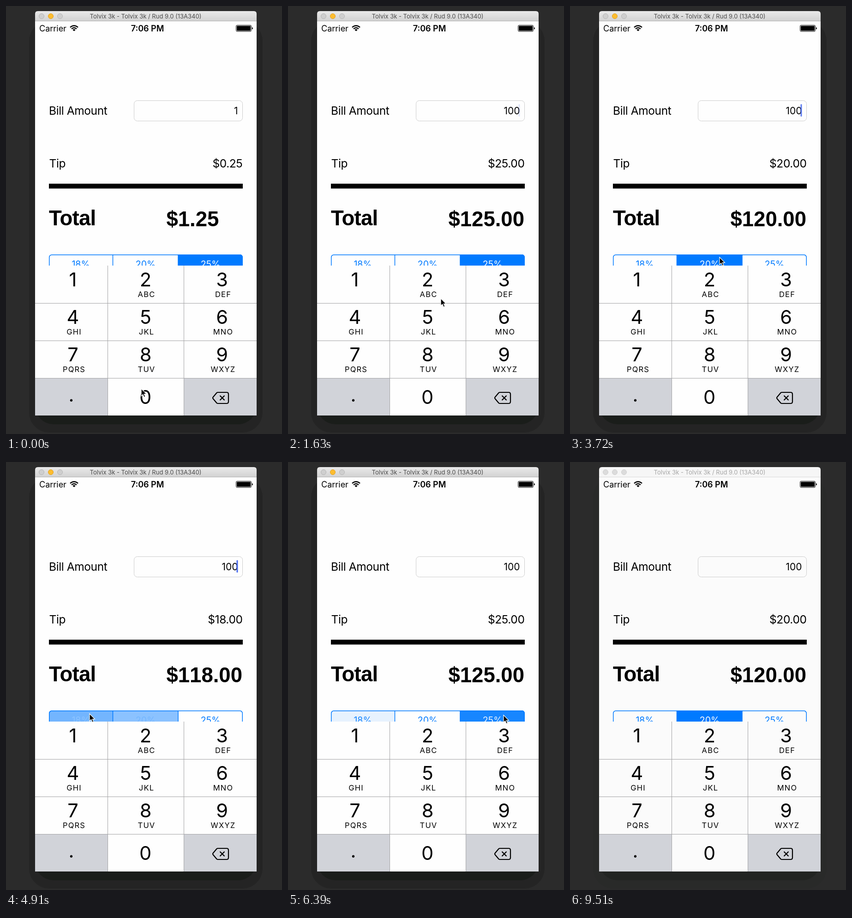
These frames come from a looping animation (598 by 925 pixels, 9610 ms). An HTML page:

```html
<!DOCTYPE html>
<html lang="en">
<head>
<meta charset="utf-8">
<title>Tip calculator</title>
<style>
  html, body { margin: 0; width: 100%; height: 100%; overflow: hidden; background: #2b2b2b; }
  svg { display: block; font-family: Inter, Roboto, sans-serif; }
  .label { font-size: 24.5px; letter-spacing: -.4px; }
  .bold { font: bold 45.5px "Liberation Sans", Arial, sans-serif; }
  #total { font-kerning: none; }
  .digit { font-size: 41.5px; text-anchor: middle; }
  .letters { font-size: 16.5px; letter-spacing: 1.2px; text-anchor: middle; }
  .percent { font-size: 19.5px; text-anchor: middle; }
  .end { text-anchor: end; }
  .mid { text-anchor: middle; }
  .line { fill: none; stroke: #000; }
  .page { fill: #fefefe; }
  #bar { fill: url(#active); }
  #barLine { fill: #b1b1b1; }
  #title { font-size: 13px; fill: #4b4b4b; }
  .light { fill: #cfcfcf; stroke: #b4b4b4; }
  .yellow { fill: #fdbd2f; stroke: #dfa023; }
  #outer { fill: #242424; }
  #inner { fill: #1a1d1a; }
  .inactive .page { fill: #fbfbfb; }
  .inactive #bar { fill: #f6f6f6; }
  .inactive #barLine { fill: #dadada; }
  .inactive #title { fill: #a6a6a6; }
  .inactive .light { fill: #dcdcdc; stroke: #cfcfcf; }
  .inactive #outer { fill: #292a29; }
  .inactive #inner { fill: #222422; }
</style>
</head>
<body>
<svg id="stage" width="598" height="925" viewBox="0 0 598 925">
  <defs>
    <linearGradient id="active" x2="0" y2="1">
      <stop stop-color="#e9e9e9"/><stop offset="1" stop-color="#d1d1d1"/>
    </linearGradient>
    <clipPath id="segClip"><rect x="93" y="537" width="420" height="44" rx="6"/></clipPath>
  </defs>

  <rect id="outer" x="50" y="32" width="506" height="890" rx="44"/>
  <rect id="inner" x="63" y="800" width="480" height="104" rx="40"/>

  <path id="bar" d="M63 33V17q0-6 6-6H537q6 0 6 6V33z"/>
  <circle class="light" cx="77" cy="22" r="5.5"/>
  <circle class="light yellow" cx="97" cy="22" r="5.5"/>
  <circle class="light" cx="117" cy="22" r="5.5"/>
  <text id="title" class="mid" x="302.5" y="27">Tolvix 3k - Tolvix 3k / Rud 9.0 (13A340)</text>
  <rect class="page" x="63" y="33" width="480" height="852"/>
  <rect id="barLine" x="63" y="32" width="480" height="1"/>

  <g font-size="18">
    <text x="72" y="55">Carrier</text>
    <text class="mid" x="306.5" y="55" font-weight="600">7:06 PM</text>
  </g>
  <g class="line" stroke-width="2.4">
    <path d="M139 46.2q8.5-7.6 17 0M142 49.4q5.500-4.600 11 0"/>
    <path d="M144.300 51.300q3.200-2.500 6.400 0L147.500 54.500z" fill="#000" stroke="none"/>
  </g>
  <rect class="line" x="498.500" y="41.500" width="33" height="13.500" rx="2.500"/>
  <rect x="500" y="43" width="30" height="10.500" rx="1"/>
  <path d="M533 46q2 0 2 2.300t-2 2.300z"/>

  <g class="label">
    <text x="93" y="235">Bill Amount</text>
    <text x="93.500" y="349">Tip</text>
    <text id="tip" class="end" x="512.500" y="349"></text>
  </g>
  <rect class="line" x="277.500" y="204.500" width="235" height="44" rx="7" style="stroke:#cdcdcd"/>
  <text id="bill" class="end" x="502.500" y="233.500" font-size="21"></text>
  <rect id="caret" x="499.500" y="212" width="3" height="27" rx="1.500" fill="#4a6cf0"/>
  <rect x="93" y="384" width="420" height="10.500"/>
  <text class="bold" x="93" y="474" letter-spacing="-.8">Total</text>
  <text id="total" class="bold" x="347.500" y="476"></text>

  <g id="segments"></g>
  <g id="keypad"></g>
  <path id="mouse" d="M0 0V16l3.600-3.400 2.500 6 2.800-1.200-2.500-5.800h5z" stroke="#fff" stroke-width="1.200"/>
</svg>

<script>
const LOOP = 9610, STEP = 148.6;
const $ = id => document.getElementById(id);
const clamp = v => Math.max(0, Math.min(1, v));

const rates = [18, 20, 25];
const edges = [93, 231.5, 373, 513];
const labelX = [162, 302.5, 443];

// [step, x, y] along the pointer's way
const pointer = [
  [7, 293, 827], [11, 331, 632], [15, 332, 561], [18, 324, 543], [27, 324, 543],
  [32, 181, 544], [34, 181, 544], [38, 536, 557], [42, 472, 551], [43, 467, 547],
  [45, 467, 547], [48, 304, 546], [50, 304, 546], [51, 306, 600], [52, 311, 687],
  [54, 195, 800], [58, 500, 908]
];
// [step, segment] for each choice of tip
const choices = [[-9, 2], [20, 1], [32.4, 0], [42, 2], [48.2, 1]];

$('segments').innerHTML =
  `<g clip-path="url(#segClip)">${rates.map((_, i) =>
    `<rect id="fill${i}" x="${edges[i]}" y="537" width="${edges[i + 1] - edges[i]}" height="44" fill="#007aff"/>`).join('')}</g>
  <path d="M231.500 537V581M373 537V581" stroke="#007aff" stroke-width="1.500"/>
  <rect x="93.750" y="537.750" width="418.500" height="44" rx="5.500" fill="none" stroke="#007aff" stroke-width="1.500"/>` +
  rates.map((r, i) => `<text id="rate${i}" class="percent" x="${labelX[i]}" y="565">${r}%</text>`).join('');

function buildKeypad() {
  const letters = ['', 'ABC', 'DEF', 'GHI', 'JKL', 'MNO', 'PQRS', 'TUV', 'WXYZ'];
  const digitX = [145, 302.5, 468], lettersX = [147.5, 304.5, 470.5];
  let out = `<rect class="page" x="63" y="561" width="480" height="324"/>
    <path d="M63 804H220V885H63zM386 804H543V885H386z" fill="#d1d3d9"/>
    <rect id="zero" x="220" y="804" width="166" height="81" fill="#d1d3d9"/>
    <path d="M220.500 561V885M385.500 561V885M63 642.500H543M63 723.500H543M63 804.500H543" stroke="#a3a3a5"/>`;
  letters.forEach((text, i) => {
    const col = i % 3, y = 606 + 81 * Math.floor(i / 3);
    out += `<text class="digit" x="${digitX[col]}" y="${y}">${i + 1}</text>
      <text class="letters" x="${lettersX[col]}" y="${y + 23}">${text}</text>`;
  });
  $('keypad').innerHTML = out + `<text class="digit" x="302" y="860">0</text>
    <text class="digit" x="141.500" y="855">.</text>
    <path class="line" stroke-width="2.200" stroke-linejoin="round"
      d="M459 835H478q4 0 4 4V855q0 4-4 4H459q-1.500 0-2.500-1L448.500 848.500q-1.200-1.500 0-3L456.500 836q1-1 2.500-1zM463.500 842l10 10m0-10l-10 10"/>`;
}
buildKeypad();

function pointerAt(step) {
  const next = pointer.findIndex(p => p[0] > step);
  if (next <= 0) return pointer[next ? pointer.length - 1 : 0].slice(1);
  const a = pointer[next - 1], b = pointer[next], f = (step - a[0]) / (b[0] - a[0]);
  return [1, 2].map(i => a[i] + (b[i] - a[i]) * f);
}

function caretAlpha(step) {
  if (step < 5) return 0;
  const phase = step * STEP / 1000 % 1;
  return phase > .45 ? clamp((phase - .615) / .115) : clamp((.3 - phase) / .16);
}

function draw(time) {
  const step = Math.floor((time % LOOP + 8) / STEP);
  const bill = step < 2 ? 1 : step < 4 ? 10 : 100;
  const last = choices.filter(c => c[0] < step).length - 1;
  const [start, chosen] = choices[last];
  const blend = clamp((step - start) / 1.1);
  const tip = bill * rates[chosen] / 100;

  $('bill').textContent = bill;
  $('tip').textContent = '$' + tip.toFixed(2);
  $('total').textContent = '$' + (bill + tip).toFixed(2);
  $('caret').style.opacity = caretAlpha(step);
  $('zero').style.opacity = step === 1 || step === 3 ? 1 : 0;

  rates.forEach((_, i) => {
    const on = i === chosen ? blend : last && i === choices[last - 1][1] ? 1 - blend : 0;
    $('fill' + i).style.opacity = on;
    $('rate' + i).style.fill = `rgb(${255 * on},${122 + 133 * on},255)`;
  });

  $('mouse').setAttribute('transform', `translate(${pointerAt(step)})`);
  $('mouse').style.display = step < 59 ? '' : 'none';
  $('stage').classList.toggle('inactive', step >= 64);
}

function tick() {
  draw(performance.now());
  requestAnimationFrame(tick);
}
tick();
</script>
</body>
</html>
```
